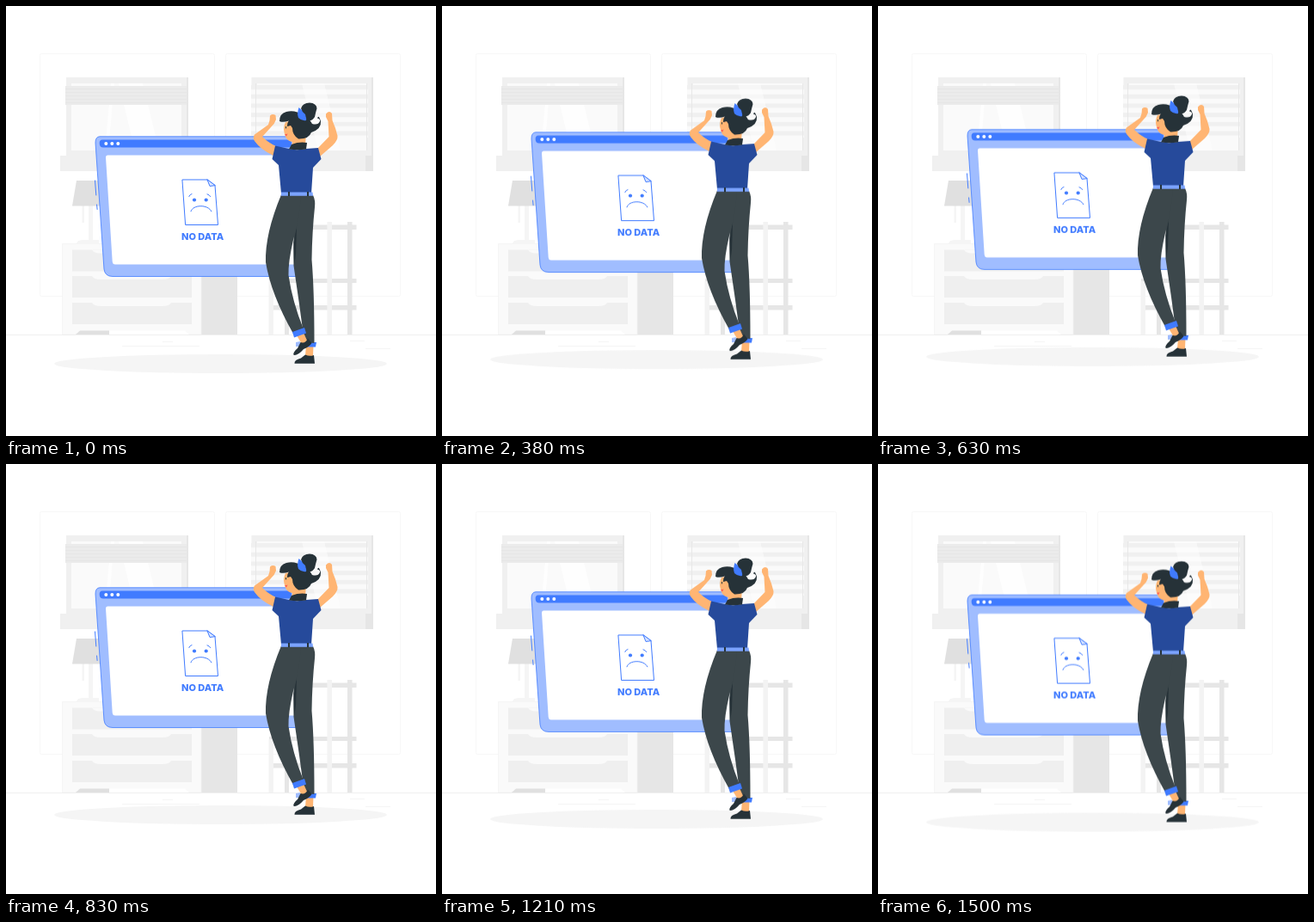
These frames come from a looping animation (500 px wide and 500 px high, 1.54 s). An HTML page:

```html
<!DOCTYPE html>
<html lang="en">
<head>
<meta charset="utf-8">
<title>No data</title>
<style>
  html, body { margin: 0; width: 100%; height: 100%; overflow: hidden; background: #fff; }
  svg { display: block; width: 100%; height: 100%; }
  .float { animation: float 770ms linear -45ms infinite alternate; }
  @keyframes float {
    from { transform: translateY(.58px); }
    to { transform: translateY(-9.42px); }
  }
  .label { font: 800 11px Inter, "Open Sans", sans-serif; fill: #407bff; text-anchor: middle; }
  .line { fill: none; stroke: #407bff; stroke-linecap: round; stroke-linejoin: round; }
  .skin { fill: #ffb573; }
  .dark { fill: #263238; }
  .pants { fill: #3c474b; }
  .blue { fill: #407bff; }
</style>
</head>
<body>
<svg viewBox="0 0 500 500">
  <defs>
    <pattern id="blind" width="8" height="4" y="93" patternUnits="userSpaceOnUse">
      <path fill="#ebebeb" d="M0 0h8v4H0z"/>
      <path fill="#e6e6e6" d="M0 3h8v1H0z"/>
    </pattern>
    <pattern id="slat" width="8" height="10.7" y="92" patternUnits="userSpaceOnUse">
      <path fill="#fafafa" d="M0 0h8v10.7H0z"/>
      <path fill="#f0f0f0" d="M0 0h8v5H0z"/>
    </pattern>
    <g id="drawer">
      <path fill="#efefef" d="M77 0h139v25H77z"/>
      <path fill="#fafafa" d="M100 0h92q-2 4-10 4h-72q-8 0-10-4z"/>
    </g>
  </defs>

  <!-- room -->
  <g fill="none" stroke="#f7f7f7">
    <rect x="39.5" y="55.5" width="203" height="282" rx="2"/>
    <rect x="255.5" y="55.5" width="203" height="282" rx="2"/>
  </g>

  <g>
    <path fill="#e6e6e6" d="M203 83h9v92h-9z"/>
    <path fill="#f0f0f0" d="M70 83h140v92H70z"/>
    <path fill="#fafafa" d="M76 90h128v78H76z"/>
    <path fill="#fff" d="M131 90h28l19 78h-28zM122 90h4l-7 78h-4z" opacity=".8"/>
    <path fill="url(#blind)" d="M69 93h141v22H69z"/>
    <path fill="#f0f0f0" d="M63 174h149v18H63z"/>
  </g>

  <g>
    <path fill="#e6e6e6" d="M418 83h9v92h-9z"/>
    <path fill="#f0f0f0" d="M285.5 83H425v92H285.5z"/>
    <path fill="#fafafa" d="M292 90h128v78H292z"/>
    <path fill="url(#slat)" d="M285 92h136v61H285z"/>
    <path fill="#fff" d="M344 90h26l19 78h-26z" opacity=".5"/>
    <path fill="none" stroke="#e8e8e8" d="M290.5 90v78M419.5 90v78"/>
    <path fill="#f0f0f0" d="M279 174h148v18H279z"/>
    <path fill="#e6e6e6" d="M418 174h9v18h-9z"/>
  </g>

  <!-- lamp and cabinet -->
  <path fill="#f5f5f5" d="M96 232h5v41h-5zM88.5 232h2.500v20h-2.500zM82 276q1-4 8-4h18v4z"/>
  <path fill="#e0e0e0" d="M82 203h35l6 29.500H77z"/>
  <path fill="#e6e6e6" d="M227 276h42v106h-42z"/>
  <path fill="#fafafa" stroke="#f3f3f3" stroke-width=".7" d="M65.500 276.500H227v105.500H65.500z"/>
  <use href="#drawer" y="283.500"/>
  <use href="#drawer" y="314"/>
  <use href="#drawer" y="345"/>
  <path fill="#e0e0e0" d="M86 377.500h34v4.500H81z"/>
  <path fill="#fff" d="M120 377.500h88l5 4.500h-93z"/>

  <!-- stool -->
  <path fill="#e6e6e6" d="M397 251h5.500v131H397zM324 290h5v92h-5z"/>
  <path fill="#e6e6e6" d="M330 254.500h77.500v5.500H330zM306 317h101.500v5H306zM306 348h101.500v5.500H306z"/>
  <path fill="#f3f3f3" d="M373.500 251h5.500v131h-5.500zM305.500 320h5.500v62h-5.500z"/>

  <path stroke="#ededed" stroke-width=".8" d="M0 382.500h500"/>
  <path stroke="#f3f3f3" stroke-width=".8" d="M135 395.500h90M182 390.500h12M400 389.500h17M418 398.500h29"/>

  <g class="float">
    <ellipse cx="249.500" cy="416" rx="193.500" ry="11" fill="#f5f5f5"/>

    <!-- browser window -->
    <path fill="#a0bdff" stroke="#407bff" stroke-width=".8" d="M109 151.800H328Q335 152 335.500 158L344 308Q344 314.500 339 314.500H124Q115 314.500 114 306L104 159Q104 152 109 151.800z"/>
    <path class="blue" d="M112 155.500H329Q332 156 332 160T329 164.500H113Q109 164.500 108.700 160T112 155.500z"/>
    <g fill="#fff">
      <circle cx="116.300" cy="160" r="2"/>
      <circle cx="123.300" cy="160" r="2"/>
      <circle cx="130.300" cy="160" r="2"/>
      <path d="M118 173.500H330Q333 173.500 333 177L339 297Q339 300.500 336 300.500H127Q124 300.500 123.700 297L116 176Q116 173.500 118 173.500z"/>
    </g>
    <path class="line" d="M103.500 203l1.300 17M105.600 231l.5 5.500"/>

    <!-- sad page -->
    <path class="line" d="M205.300 202H234L243 208.700 246.500 254.500H209z"/>
    <path class="line" style="fill:#d9e5ff" d="M234 202l3 7.500 6-.8z"/>
    <circle class="blue" cx="219" cy="225.500" r="2.100"/>
    <circle class="blue" cx="232.700" cy="225.500" r="2.100"/>
    <path class="line" d="M212.800 221.500q1-2.500 3.200-3M234 218.800q2.500.7 3.800 2.800M215 238.800c2-8 20-8.500 23.800 0"/>
    <text class="label" x="228.600" y="272.500">NO DATA</text>

    <!-- arms, neck and face -->
    <path class="skin" d="M307 127.500Q310 125 313.500 127L314 132Q312.500 137 308 141L298 152Q305 159 314 163L311 174Q296 167 289 157 286.500 153 289 149.500L305 138Q307 134 307 127.500z"/>
    <path class="skin" d="M372 125.500Q376 121 379 125L379.500 133Q383.500 142 385.500 151 386 156 380 162L365 175 361 167 375.500 152 374.500 134 372 129z"/>
    <path class="skin" d="M325 135Q322 141 323.500 147L325 152Q327 157 333 158L332 164H348L349 145 338 132z"/>
    <path fill="#ff5652" d="M324 149.500l3.500-1-1.500 3z"/>
    <path class="line" style="stroke:#263238" d="M325.500 140.500v1.500"/>

    <!-- hair -->
    <path class="dark" d="M318 134Q318 125 326 123 336 120.500 346 127 353 131 356 137 363 139 365 134 365.500 131 362 130.500 363.500 126 366 134 367 143 355 147 352 155 340 154.500 333 150 333 142L331 139 327 140Q327 135 329 133.500 322 136 318 134z"/>
    <path class="blue" d="M340.500 118Q338 125 340 130 344 134 349 133L350 126z"/>
    <path class="dark" d="M343 119Q345 112.500 353 112.500 361 113 361.500 119 360 124 359 129 356 134 351 133 349 132 348 126 344 123 343 119z"/>

    <!-- shirt -->
    <path fill="#264a9b" d="M313 162.500L331 166.500Q340 168 349 166L363 165 366.500 178 357 188 355 218H320L317 185 309.500 178z"/>
    <path class="dark" d="M332 161Q341 157.500 350 159L349 166.500Q339 168 329 166.500z"/>

    <!-- right leg -->
    <path class="skin" d="M349 394h8.500l-.5 13h-9z"/>
    <path class="dark" d="M335.500 415.700Q335 411.500 343 409.500L348 405.500Q353 408 358 406L359 415.700z"/>
    <path class="blue" d="M349 391H361L360 396.500H349z"/>
    <path class="pants" d="M330 220H357Q360 226 359 234 356 262 355.500 295 358.500 330 358.500 392L347 391Q341 345 334.500 302 334 280 335 250z"/>
    <path class="dark" d="M338 256L334.500 275 335.200 302 337 288z"/>

    <!-- left leg -->
    <path class="skin" d="M338 383l8-3 4.500 10-6 4z"/>
    <path fill="#a0bdff" d="M337 391l5-1v6h-5z"/>
    <path class="dark" d="M334.200 405.500Q334 402 339 398L342.500 391Q348 393 351 386.500L355.500 392Q353 396 346 399 340 406 335.500 406z"/>
    <path class="pants" d="M320 219.500H343Q341 250 334 272 328 298 328.500 313 333 344 346 376L334 381Q308 335 302 298 301 265 320 219.500z"/>
    <path class="blue" d="M333 379l14-5 2 6.500-14 5z"/>

    <!-- belt -->
    <path fill="#7ba3ff" d="M320 216.500h36.500l.5 4.200h-37.200z"/>
    <path class="dark" d="M328 216h2v5h-2zM350 216h2v5h-2z"/>
  </g>
</svg>
</body>
</html>
```
